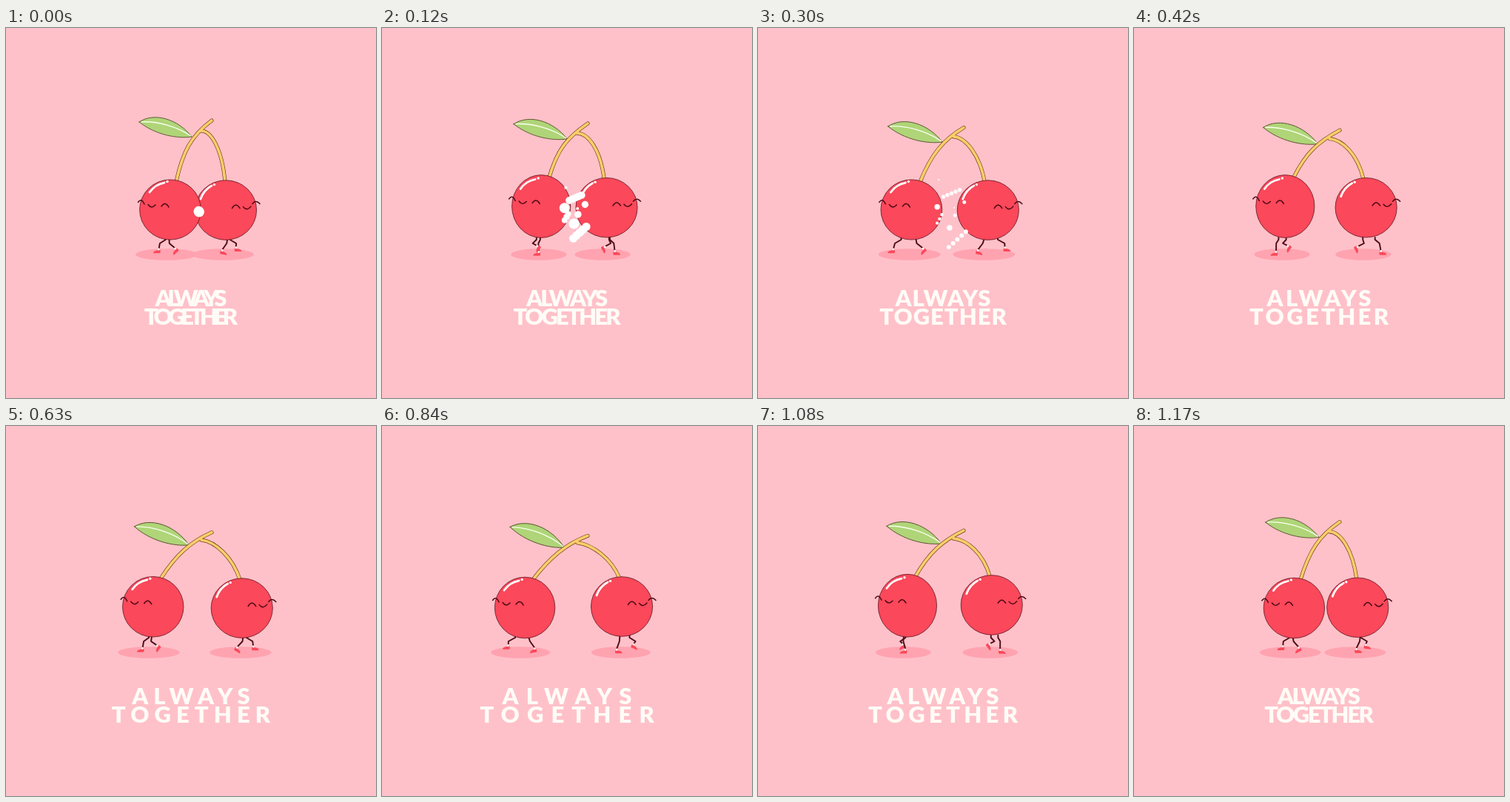
An HTML page that plays this animation: 500 px wide and 500 px high, repeating every 1200 ms.

```html
<!DOCTYPE html>
<html lang="en">
<head>
<meta charset="utf-8">
<title>Always together</title>
<style>
  html, body { margin: 0; width: 100%; height: 100%; overflow: hidden; background: #ffc1c9; }
  svg { display: block; width: 100vw; height: 100vh; }
  path, line { fill: none; stroke-linecap: round; stroke-linejoin: round; }
  text { font: 900 31px Lato, Inter, sans-serif; fill: #fffcf7; text-anchor: middle; }
  .shadow { fill: #ffa3b0; }
  .body { fill: #fb485a; stroke: #5c1420; stroke-width: .8; }
  .face { stroke: #4c0a16; stroke-width: 1.5; }
  .leg { stroke: #4c0a16; stroke-width: 1.9; }
  .sock { stroke: #fff; stroke-width: 2.2; stroke-linecap: butt; }
  .shoe { fill: #fb485a; }
  .shine { stroke: #fff; stroke-width: 2.8; }
  .white { fill: #fff; }
  .rim { stroke: #6b3a1e; stroke-width: 5; }
  .stem { stroke: #fccd69; stroke-width: 3.7; }
  .leaf { fill: #afd578; stroke: #56492a; stroke-width: .8; }
  .vein { stroke: #fbfff0; stroke-width: 1.3; }
</style>
</head>
<body>
<svg id="stage" viewBox="0 0 500 500"></svg>
<script>
const LOOP = 1200, STEP = 30, STRIDE = 600, TURN = 960;
const stage = document.getElementById("stage");

function set(node, attrs) {
  for (const k in attrs) node.setAttribute(k, attrs[k]);
  return node;
}
function add(parent, tag, attrs) {
  const node = document.createElementNS("http://www.w3.org/2000/svg", tag);
  parent.appendChild(node);
  return set(node, attrs || {});
}
const mix = (a, b, u) => a + (b - a) * u;
const bob = (t, peak) => Math.cos(2 * Math.PI * (t - peak) / (STRIDE / 2));

// 0 = touching, 1 = furthest apart: a slow drift out, a quick pull back
function spread(t) {
  return t < TURN
    ? 1 - Math.pow(1 - t / TURN, 1.3)
    : 1 - Math.pow((t - TURN) / (LOOP - TURN), 1.5);
}

// A foot swings on an ellipse; hip and knee follow it. lead = time of the foremost step.
function makeLeg(parent, dir, lead, mid) {
  const bone = add(parent, "path", { class: "leg" });
  const foot = add(parent, "g");
  add(foot, "path", { class: "shoe", d: "M-1.8 1.6Q.5 .8 2.2 2Q7.4 2.6 7.6 5.8L-1.6 5.8Q-2.5 3.6 -1.8 1.6Z" });
  add(foot, "line", { class: "sock", x1: 0, y1: -.8, x2: .4, y2: 2 });
  return (t, cx) => {
    const a = 2 * Math.PI * (t - lead) / STRIDE;
    const reach = mid + 15.5 * Math.cos(a);
    const ay = 298 + 4 * Math.sin(a);
    const hip = .4 * reach + .45 * mid;
    const knee = (hip + reach) / 2 + 1.5 + (302 - ay) / 2;
    const tilt = 60 * Math.max(0, Math.cos(a + 2.25));
    const x = forward => cx + dir * forward;
    set(bone, { d: `M${x(hip)} 283V286L${x(knee)} 291L${x(reach)} ${ay}` });
    set(foot, { transform: `translate(${x(reach)} ${ay}) scale(${dir} 1) rotate(${tilt})` });
  };
}
function makeLegs(dir, lead) {
  const g = add(stage, "g");
  return [makeLeg(g, dir, lead + STRIDE / 2, 0), makeLeg(g, dir, lead, 9)];
}

function makeCherry(face, shine, dot) {
  const g = add(stage, "g");
  const skin = add(g, "ellipse", { class: "body" });
  add(g, "path", { class: "shine", d: shine });
  add(g, "circle", { class: "white", cx: dot[0], cy: dot[1], r: 1.7 });
  add(g, "path", { class: "face", d: face });
  return (x, y, rx, ry) => {
    set(g, { transform: `translate(${x} ${y})` });
    set(skin, { rx, ry });
  };
}

const shadows = [0, 1].map(() => add(stage, "ellipse", { class: "shadow", cy: 306, ry: 7.8 }));

const leaf = add(stage, "g");
add(leaf, "path", { class: "leaf", d: "M0 0C16 -19 50 -18 74 0C56 8 26 11 0 0Z" });
add(leaf, "path", { class: "vein", d: "M3 -1C24 -8 50 -8 72 -1" });

const rims = [0, 1].map(() => add(stage, "path", { class: "rim" }));
const stems = [0, 1].map(() => add(stage, "path", { class: "stem" }));

const leftLegs = makeLegs(-1, 290);
const rightLegs = makeLegs(1, 345);

const rightCherry = makeCherry(
  "M8.5 -2.5Q13.5 -11 19 -2.5M23.5 -4.5Q28.5 2 34 -5M36 -8.5Q40.5 -14.5 46 -8.5",
  "M-34 -15Q-30 -27 -19 -33", [-15.5, -34.5]);
const leftCherry = makeCherry(
  "M-43.5 -10Q-39 -16.5 -35 -7.5M-30 -7Q-25.5 -.5 -20 -6.5M-12 -4.5Q-7 -12 -2 -3.5",
  "M-28 -23.5Q-21 -34 -8 -36.5", [-4, -38]);

// Streaks of puffs around the bump: from x, y, to x, y, count, radius
const puffs = [
  [251, 229, 272, 220, 5, 5], [258, 294, 280, 274, 5, 5.6], [243, 263, 249, 252, 3, 4],
  [243, 242, 259, 269, 2, 7], [278, 236, 266, 253, 2, 4.7], [245, 207, 265, 243, 2, 2]
].flatMap(([x1, y1, x2, y2, count, r]) => Array.from({ length: count }, (_, i) => {
  const u = i / (count - 1);
  return { x: mix(x1, x2, u), y: mix(y1, y2, u), r, node: add(stage, "circle", { class: "white" }) };
}));

function burst(t) {
  const ease = ms => 1 - Math.pow(1 - Math.min((ms + 3) / 330, 1), 3);
  const reach = ease(t) / ease(210);
  const size = Math.max(0, Math.min(1, (390 - t) / 170));
  for (const { x, y, r, node } of puffs)
    set(node, { cx: mix(261, x, reach), cy: mix(248, y, reach), r: r * size });
}

const lines = [["ALWAYS", 376], ["TOGETHER", 401]].map(([word, y]) => {
  const node = add(stage, "text", { y });
  node.textContent = word;
  return node;
});
const plainWidth = lines[1].getComputedTextLength() - 2.5;

function draw(t) {
  const p = spread(t);
  const recoil = t < 500 ? 2.8 * Math.sin(Math.PI * t / 500) : 0;
  const lx = 222 - 31 * p - recoil, ly = 243.5 + 2.5 * bob(t, -30);
  const rx = 297 + 29 * p + recoil, ry = 244 + 2.2 * bob(t, 15);
  const squash = 40.4 + bob(t, 0);

  leftCherry(lx, ly, squash, 82 - squash);
  rightCherry(rx, ry, 41.6, 40.3);
  leftLegs.forEach(leg => leg(t, lx));
  rightLegs.forEach(leg => leg(t, rx));

  const wide = 39.6 + 2.5 * bob(t, 5);
  set(shadows[0], { cx: 217 - 32 * p, rx: wide });
  set(shadows[1], { cx: 293 + 32 * p, rx: wide });

  const ky = 125 + 25 * p, jy = 139 + 20 * p;
  const ax = 230 - 28 * p, ay = ly - 38;
  const bx = 296 + 27 * p, by = ry - 38;
  const paths = [
    `M264 ${jy}C${277 + 8 * p} ${jy + 3 * p} ${bx - 4 - 8 * p} ${by - 45 + 19 * p} ${bx} ${by}`,
    `M278 ${ky}C${250 - p} ${ky + 21 - 11 * p} ${ax + 9 + 15 * p} ${ay - 41 + 12 * p} ${ax} ${ay}`
  ];
  paths.forEach((d, i) => { set(rims[i], { d }); set(stems[i], { d }); });

  const q = 1 - (1 - p) * (1 - p);
  const tx = 180 - 7 * q, ty = 127 + 9.5 * q;
  const dx = 251 - 5 * p - tx, dy = 147 + 18.5 * p - ty;
  const turn = Math.atan2(dy, dx) * 180 / Math.PI;
  set(leaf, { transform: `translate(${tx} ${ty}) rotate(${turn}) scale(${Math.hypot(dx, dy) / 74})` });

  burst(t);

  const track = (124 + 117 * p - plainWidth) / 7;
  for (const line of lines) {
    line.style.letterSpacing = track + "px";
    set(line, { x: 250 + track / 2 });
  }
}

const start = performance.now();
function tick() {
  const t = (performance.now() - start) % LOOP;
  draw(Math.floor(t / STEP) * STEP);
  requestAnimationFrame(tick);
}
tick();
</script>
</body>
</html>
```
